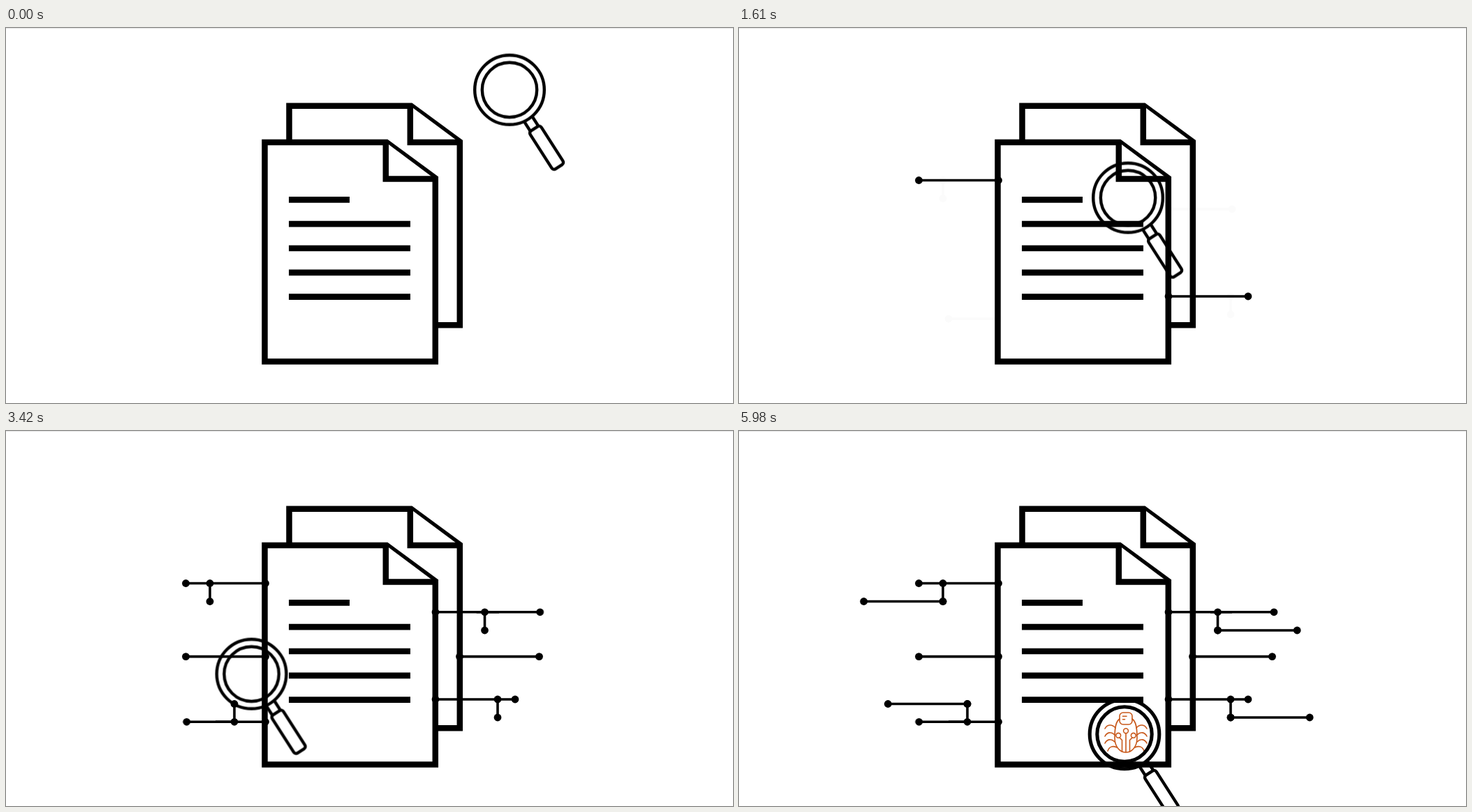
Write an HTML page without scripts that moves like this. It is 1041 px wide and 538 px high and loops after 8200 ms.

```html
<!DOCTYPE html>
<html lang="en">
<head>
<meta charset="utf-8">
<title>Document inspection</title>
<style>
  html, body { margin: 0; width: 100%; height: 100%; overflow: hidden; background: #fff; }
  svg { display: block; width: 100vw; height: 100vh; fill: none; stroke: #000; }

  .page { fill: #fff; stroke-width: 8.5; }
  .bars { stroke-width: 8.7; }
  .wires { stroke-width: 3.6; }
  .wires .link { marker: url(#dot); }
  .glass { stroke-width: 4.4; }
  .bug { stroke: #c8581a; stroke-width: 1.6; stroke-linecap: round; }

  /* One 8.2 s loop with five moves sharing one easing curve */
  .glass, .ring, .grow { animation: 8.2s cubic-bezier(.3, .1, .3, 1) infinite; }
  .glass { animation-name: travel; }
  .ring { animation-name: thicken; }
  .grow { animation-name: grow; }
  .fade { animation: 8.2s linear infinite; }
  .first { animation-name: fade-first; }
  .second { animation-name: fade-second; }
  .third { animation-name: fade-third; }
  .fourth { animation-name: fade-fourth; }
  .fifth { animation-name: fade-fifth; }

  @keyframes travel {
    0%, 4.51% { transform: translate(721px, 88.7px); }
    13.9%, 16.83% { transform: translate(616px, 228px); }
    25.98%, 33.9% { transform: translate(486px, 262.3px); }
    43.41%, 46.95% { transform: translate(348.5px, 350.5px); }
    56.59%, 62.68% { transform: translate(458px, 430px); }
    72.93%, 100% { transform: translate(552px, 435px); }
  }
  @keyframes thicken {
    0%, 62.68% { stroke-width: 4.4; }
    72.93%, 100% { stroke-width: 5.1; }
  }
  @keyframes grow {
    0%, 33.9% { transform: none; }
    43.41%, 100% { transform: translateX(var(--by)); }
  }
  @keyframes fade-first { 0%, 7.33% { opacity: 0; } 12.21%, 100% { opacity: 1; } }
  @keyframes fade-second { 0%, 19.57% { opacity: 0; } 24.33%, 100% { opacity: 1; } }
  @keyframes fade-third { 0%, 36.76% { opacity: 0; } 41.7%, 100% { opacity: 1; } }
  @keyframes fade-fourth { 0%, 49.84% { opacity: 0; } 54.85%, 100% { opacity: 1; } }
  @keyframes fade-fifth { 0%, 65.76% { opacity: 0; } 71.08%, 100% { opacity: 1; } }
</style>
</head>
<body>
<svg viewBox="0 0 1041 538" preserveAspectRatio="none">
  <defs>
    <marker id="dot" markerUnits="userSpaceOnUse" markerWidth="12" markerHeight="12" refX="6" refY="6">
      <circle cx="6" cy="6" r="5.4" fill="#000" stroke="none"/>
    </marker>
    <g id="page">
      <path d="M370.5 164H545L614.8 215.5V478.5H370.5Z"/>
      <path d="M543.8 164V216.4H614"/>
    </g>
    <g id="bug-half">
      <path d="M545 413C539 417 538 427 538 440C538 454 546 461 554 461"/>
      <path d="M539 426C534 420 527 421 524 427M538 436C533 431 527 432 524 438M538 446C533 441 527 442 524 448M541 454C535 451 530 453 528 459"/>
      <circle cx="543.2" cy="436.8" r="3.4"/>
      <path d="M545 440L548.5 443.5V460"/>
    </g>
  </defs>

  <path d="M0 .5H1041" stroke="#e6e6e6"/>

  <g class="page">
    <use href="#page" x="35" y="-52.3"/>
    <use href="#page"/>
  </g>
  <path class="bars" d="M405 246.3H492M405 281.2H579M405 316H579M405 350.8H579M405 385.6H579"/>

  <g class="wires">
    <g class="fade first">
      <path class="link" d="M257.5 218.5H371.5"/>
      <path class="link" d="M615 385H729"/>
    </g>
    <g class="fade second">
      <path class="link" d="M292 218.5V244.5"/>
      <path class="link" d="M704 385V411"/>
      <path d="M300 417.3H371.5M615 259.8H706"/>
      <circle cx="371.5" cy="417.3" r="5.4" fill="#000" stroke="none"/>
      <circle cx="615" cy="259.8" r="5.4" fill="#000" stroke="none"/>
      <g class="grow" style="--by:-42.3px">
        <path d="M300 417.3H371.5" marker-start="url(#dot)"/>
      </g>
      <g class="grow" style="--by:60px">
        <path d="M615 259.8H706" marker-end="url(#dot)"/>
      </g>
    </g>
    <g class="fade third">
      <path class="link" d="M257.5 323.6H371.5"/>
      <path class="link" d="M649.5 323.6H763.5"/>
      <path class="link" d="M327 391.5V417.3"/>
      <path class="link" d="M685.5 259.8V286"/>
    </g>
    <g class="fade fourth">
      <path class="link" d="M178.7 244.5H292"/>
      <path class="link" d="M213.3 391.5H327"/>
      <path class="link" d="M685.5 286H799.2"/>
      <path class="link" d="M704 411H817.2"/>
    </g>
  </g>

  <g class="bug fade fifth">
    <use href="#bug-half"/>
    <use href="#bug-half" transform="translate(1108 0) scale(-1 1)"/>
    <rect x="545" y="404" width="18" height="17" rx="5"/>
    <path d="M549.5 409.3H555M549.5 413.8H552.5M554 434V460"/>
    <circle cx="554" cy="430.2" r="3.4"/>
  </g>

  <g class="glass">
    <g class="ring">
      <circle r="49.8"/>
      <circle r="39.2"/>
    </g>
    <g transform="rotate(57.4)">
      <path d="M51 -6.8H66M51 6.8H66"/>
      <rect x="66" y="-9.5" width="65" height="19" rx="4"/>
    </g>
  </g>
</svg>
</body>
</html>
```
